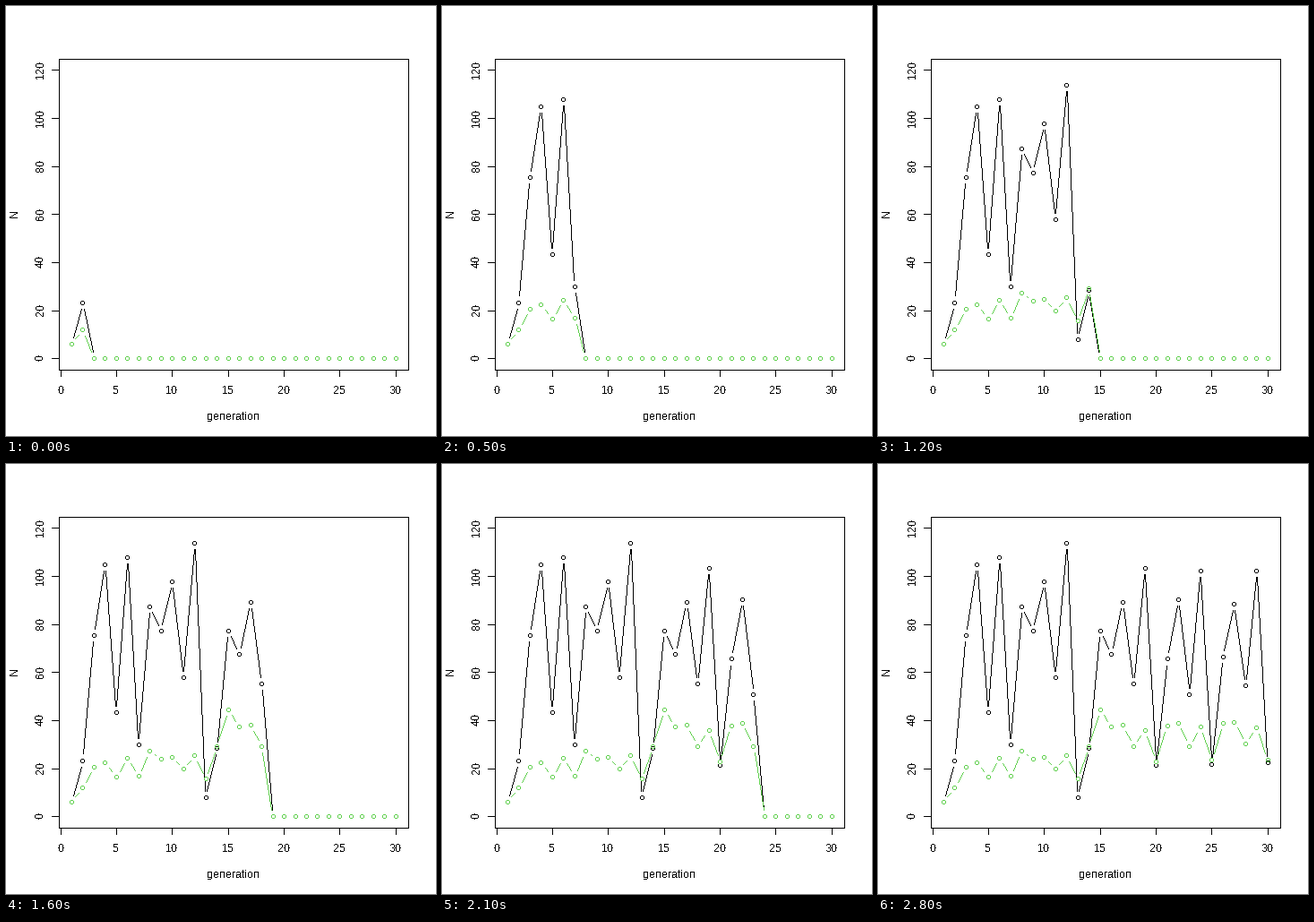
Animation, 480 px wide and 480 px high, one loop 2.9 s. Source, as a matplotlib script:

```python
import numpy as np
import matplotlib.pyplot as plt
from matplotlib.animation import FuncAnimation

plt.rcParams.update({"font.family": "Liberation Sans", "font.size": 12,
                     "text.hinting": "native", "text.hinting_factor": 1})

SIZE = 480
COUNT = 30
LEFT, RIGHT, TOP, BOTTOM = 59, 449, 59, 406
TICK = 7
GAP = 7.2
BLACK, GREEN = (0, 0, 0), (97, 208, 79)


def compete(count):
    """Two competing species, each growing logistically."""
    n = g = 6.0
    for _ in range(count):
        yield n, g
        n, g = (n + 3.2 * n * (1 - (n + 0.6 * g) / 100),
                g + 1.1 * g * (1 - (g + 1.2 * n) / 120))


def px(gen):
    return 61.036 + 12.475 * gen


def py(n):
    return 393.69 - 2.6815 * n


def stroke(img, a, b, color):
    """One-pixel line without antialiasing."""
    a, b = np.floor(a), np.floor(b)
    steps = int(np.abs(b - a).max())
    pts = np.linspace(a, b, steps + 1)
    x, y = np.floor(pts + 0.5).astype(int).T
    img[y, x] = color


def ring(img, center, color):
    x, y = np.floor(center).astype(int)
    for d in (-2, 2):
        img[y + d, x - 1:x + 2] = color
        img[y - 1:y + 2, x + d] = color


def plot(img, pts, color):
    """Points joined by lines that stop short of them."""
    for a, b in zip(pts[:-1], pts[1:]):
        length = np.hypot(*(b - a))
        if length > 2 * GAP:
            trim = (b - a) * GAP / length
            stroke(img, a + trim, b - trim, color)
    for p in pts:
        ring(img, p, color)


def label(x, y, text, angle=0):
    ax.text(x, y, text, rotation=angle, rotation_mode="anchor",
            ha="center", va="baseline", antialiased=False)


fig = plt.figure(figsize=(SIZE / 72, SIZE / 72), dpi=72, facecolor="white")
ax = fig.add_axes([0, 0, 1, 1])
ax.axis("off")

base = np.full((SIZE, SIZE, 3), 255, np.uint8)
for y in (TOP, BOTTOM):
    stroke(base, (LEFT, y), (RIGHT, y), BLACK)
for x in (LEFT, RIGHT):
    stroke(base, (x, TOP), (x, BOTTOM), BLACK)
for gen in range(0, 31, 5):
    x = px(gen)
    stroke(base, (x, BOTTOM), (x, BOTTOM + TICK), BLACK)
    label(x - 0.5, 433, str(gen))
for n in range(0, 121, 20):
    y = py(n)
    stroke(base, (LEFT - TICK - 1, y), (LEFT, y), BLACK)
    label(42, y - 1, str(n), 90)
label(254, 462, "generation")
label(13, 232, "N", 90)

picture = ax.imshow(base, extent=(0, SIZE, SIZE, 0), aspect="auto",
                    interpolation="nearest")

gens = np.arange(1, COUNT + 1)
series = np.array(list(compete(COUNT))).T


def draw(i):
    img = base.copy()
    for values, color in zip(series, (BLACK, GREEN)):
        shown = np.where(gens <= i + 2, values, 0)
        plot(img, np.column_stack([px(gens), py(shown)]), color)
    picture.set_data(img)
    return [picture]


anim = FuncAnimation(fig, draw, frames=COUNT - 1, interval=100,
                     repeat=True, repeat_delay=0)
plt.show()
```
